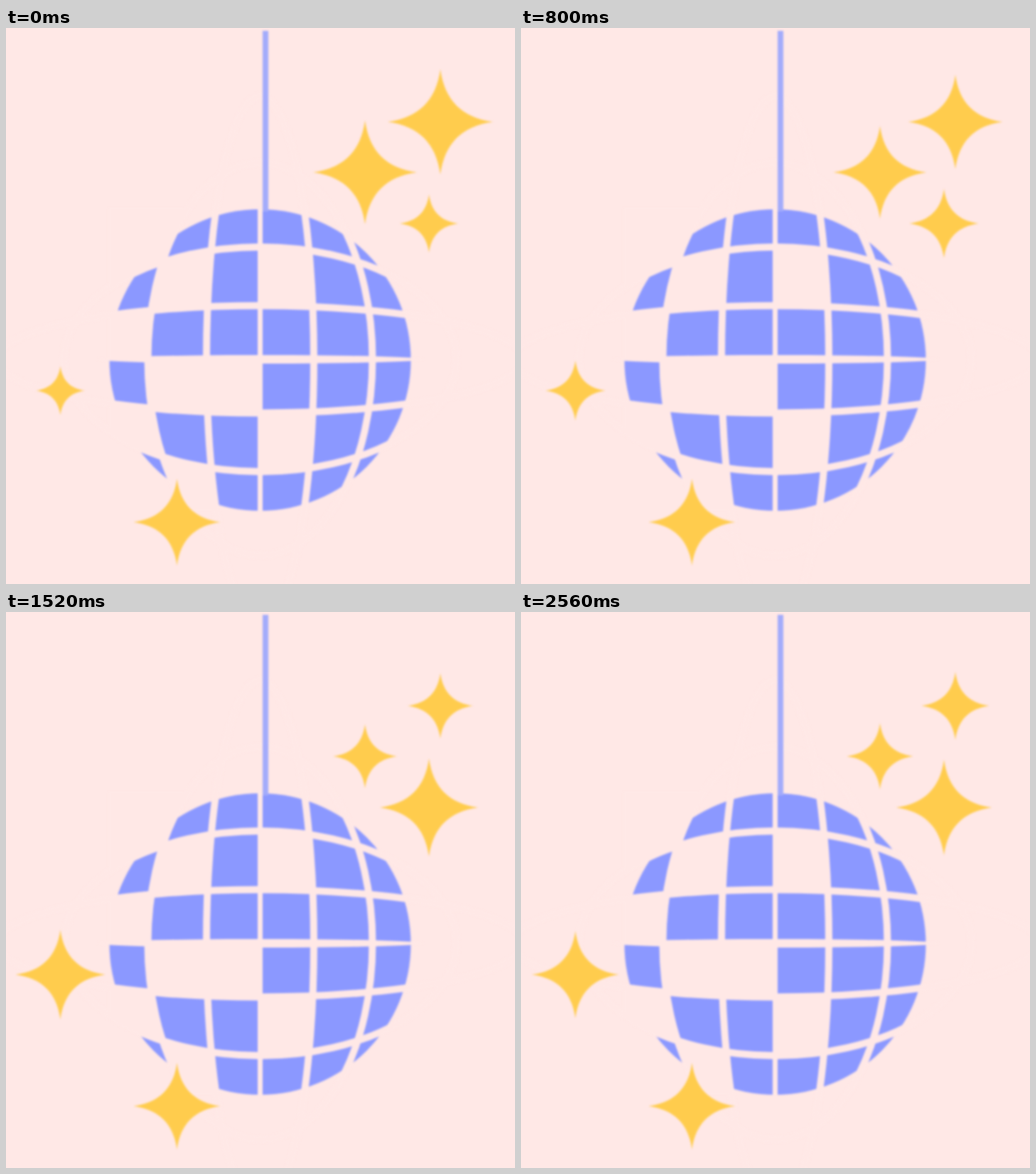
Write an HTML page that moves like this. It is 716 px wide and 782 px high and loops after 2640 ms.

```html
<!DOCTYPE html>
<html lang="en">
<head>
<meta charset="utf-8">
<title>Disco ball</title>
<style>
  html, body { margin: 0; width: 100%; height: 100%; overflow: hidden; background: #ffe8e6; }
  svg { display: block; width: 100%; height: 100%; }
  #scene { filter: blur(1.7px); }
  #stars { fill: #ffcc4d; }
  .gap { fill: none; stroke: #ffe8e6; stroke-width: 10; }
  .blank { fill: #ffe8e6; }
</style>
</head>
<body>
<svg viewBox="0 0 716 782">
  <g id="scene">
    <circle cx="357.5" cy="467" r="212" fill="#8b98ff"/>
    <g id="grid" transform="translate(357.5 466)"></g>
    <rect x="361" y="4" width="8" height="254" fill="#a3abfb"/>
    <g id="stars"></g>
  </g>
</svg>
<script>
const STEP = 80, STEPS = 33;
const PERIOD = STEPS / 5, LOW = 19;
const EDGE = 213;
const STAR = 'M0-1C.08-.41 .41-.08 1 0C.41 .08 .08 .41 0 1C-.08 .41-.41 .08-1 0C-.41-.08-.08-.41 0-1Z';

// Grid curves are half ellipses: distance from the centre, long radius
const LINES = [[0, 370], [75.5, 370], [158, 276], [EDGE, Infinity]];

// Tiles left out: column and row from the centre, negative for left and up
const BLANKS = ['1,-2', '1,2', '-3,-3', '-2,-2', '-3,-1', '-1,1', '-2,1', '-3,2', '-2,3'];

// Centre, radius at the low and high end of the pulse
const STARS = [
  [611, 132, 46, 74],
  [505, 203, 45, 73],
  [595, 275, 69, 41],
  [76.5, 510, 63, 34.5],
  [240.5, 695, 61, 61]
];

function add(parent, tag, attrs) {
  const el = document.createElementNS('http://www.w3.org/2000/svg', tag);
  for (const key in attrs) el.setAttribute(key, attrs[key]);
  return document.getElementById(parent).appendChild(el);
}

const bend = ([a, b], across) => a * Math.sqrt(1 - (across / b) ** 2);

function crossing(col, row) {
  let x = LINES[col][0], y = LINES[row][0];
  for (let i = 0; i < 8; i++) {
    x = bend(LINES[col], y);
    y = bend(LINES[row], x);
  }
  return [x, y];
}

function drawGrid() {
  for (const [a, b] of LINES.slice(1, 3)) {
    add('grid', 'ellipse', { class: 'gap', rx: a, ry: b });
    add('grid', 'ellipse', { class: 'gap', rx: b, ry: a });
  }
  add('grid', 'rect', { class: 'blank', x: -3.5, y: -EDGE, width: 7, height: 2 * EDGE });
  add('grid', 'ellipse', { class: 'blank', rx: 230, ry: 6 });

  for (const cell of BLANKS) {
    const [col, row] = cell.split(',').map(Number);
    const c = Math.abs(col), r = Math.abs(row);
    const points = [[c - 1, r - 1], [c, r - 1], [c, r], [c - 1, r]].map(corner => {
      const [x, y] = crossing(...corner);
      return [x * Math.sign(col), y * Math.sign(row)];
    });
    add('grid', 'polygon', { class: 'blank', points: points.join(' ') });
  }
}

// Triangle wave; the loop opens on a held peak
function pulse(step) {
  if (step === 0) return 1;
  const phase = Math.abs(step - LOW) % PERIOD;
  return Math.min(phase, PERIOD - phase) / (PERIOD / 2);
}

drawGrid();
const stars = STARS.map(() => add('stars', 'path', { d: STAR }));

function draw(ms) {
  const k = pulse(Math.floor(ms / STEP) % STEPS);
  STARS.forEach(([x, y, low, high], i) => {
    const r = low + (high - low) * k;
    stars[i].setAttribute('transform', `translate(${x} ${y}) scale(${r})`);
  });
}

const start = performance.now();
function tick() {
  draw(performance.now() - start);
  requestAnimationFrame(tick);
}
tick();
</script>
</body>
</html>
```
